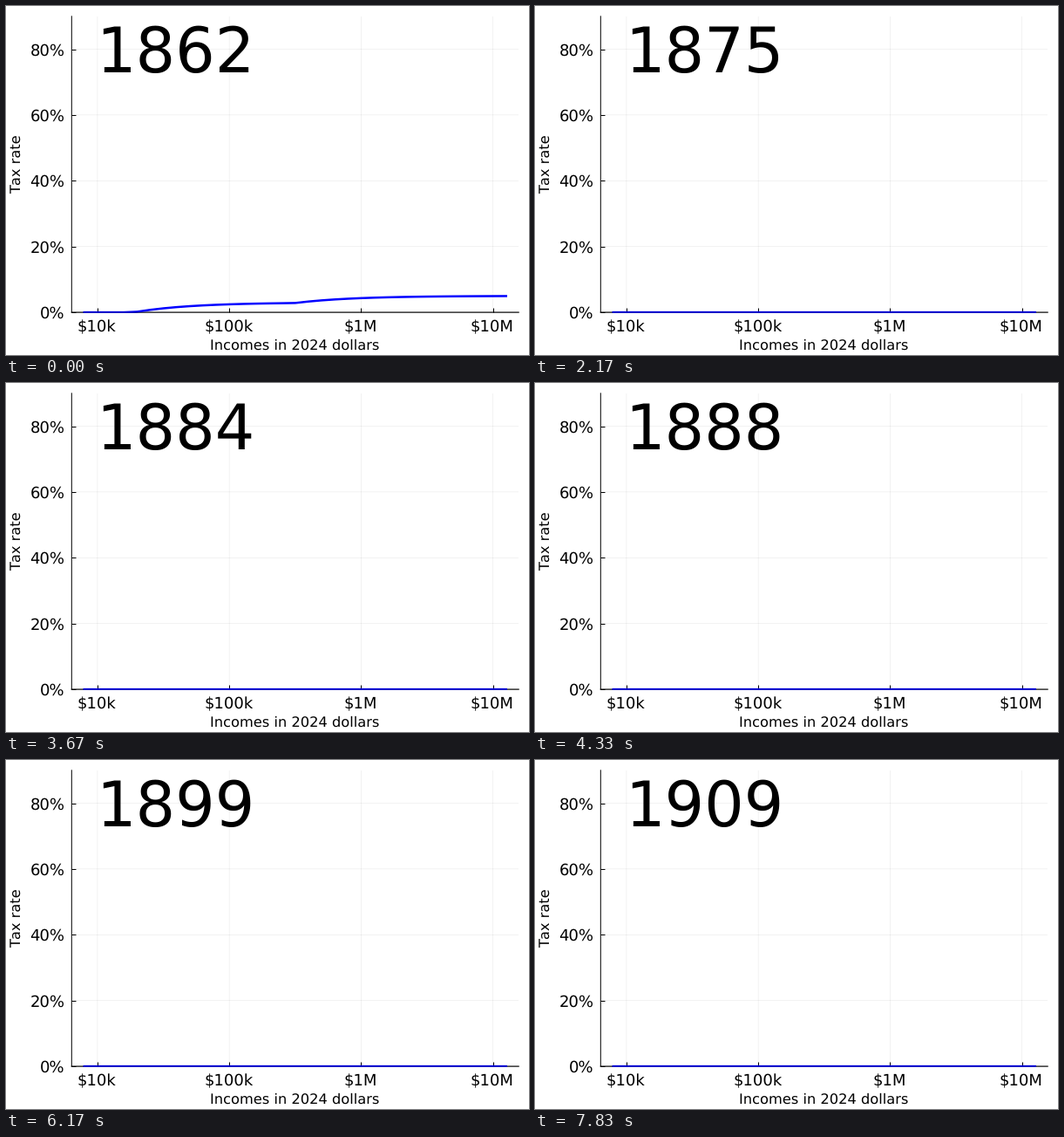
These frames come from a looping animation (600x400 px, 8000 ms). A matplotlib script:

```python
import numpy as np
import matplotlib.pyplot as plt
from matplotlib.animation import FuncAnimation
from matplotlib.transforms import Bbox

W, H, DPI = 600, 400, 100
PX = 72 / DPI                      # one pixel in points
FIRST_YEAR, YEARS = 1862, 48
LOOP_MS, STEP_MS = 8000, 20

plt.rcParams.update({
    "font.family": "DejaVu Sans",
    "text.hinting": "none",
    "text.kerning_factor": 6,      # practically no kerning
    "path.snap": False,
})

# Brackets as (threshold in dollars of the day, marginal rate in percent)
CIVIL_WAR = [(600, 3), (10000, 5)]
ACT_1864 = [(600, 5), (5000, 7.5), (10000, 10)]
ACT_1865 = [(600, 5), (5000, 10)]
ACT_1867 = [(1000, 5)]
ACT_1870 = [(2000, 2.5)]
BRACKETS = {
    1862: CIVIL_WAR, 1863: CIVIL_WAR, 1864: ACT_1864,
    1865: ACT_1865, 1866: ACT_1865,
    1867: ACT_1867, 1868: ACT_1867, 1869: ACT_1867, 1870: ACT_1867,
    1871: ACT_1870, 1872: ACT_1870,
    1894: [(4000, 2)],
}
CPI = dict(zip(range(1862, 1873), (30, 37, 47, 46, 44, 42, 40, 40, 38, 36, 36)))
CPI[1894] = 26
CPI_2024 = 939.6

log_income = np.linspace(3.9, 7.1, 33)
income = 10 ** log_income


def tax_rate(year):
    """Average tax rate in percent for each income in 2024 dollars."""
    tax = np.zeros_like(income)
    last = 0
    for threshold, rate in BRACKETS.get(year, []):
        floor = threshold * CPI_2024 / CPI[year]
        tax += (rate - last) * np.maximum(income - floor, 0)
        last = rate
    return tax / income


fig = plt.figure(figsize=(W / DPI, H / DPI), dpi=DPI, facecolor="white")
LEFT, RIGHT, TOP, BOTTOM = 75.3, 588.2, 11.8, 351.1
ax = fig.add_axes([LEFT / W, 1 - BOTTOM / H, (RIGHT - LEFT) / W, (BOTTOM - TOP) / H])
ax.set_xlim(3.804, 7.196)
ax.set_ylim(0, 90)
ax.set_xticks([4, 5, 6, 7], labels=[])
ax.set_yticks(range(0, 100, 20), labels=[])
ax.tick_params(direction="in", length=4.7 * PX, width=PX)
ax.grid(color="black", alpha=0.1, linewidth=0.5 * PX)
ax.set_axisbelow(True)
for side, spine in ax.spines.items():
    spine.set_visible(side in ("left", "bottom"))
    spine.set_linewidth(PX)
    spine.set_zorder(1.5)


def label(x, y, text, size, ha="center", **kw):
    """Text with its baseline at pixel (x, y), measured from the top left."""
    return fig.text(x / W, 1 - y / H, text.replace("$", r"\$"), fontsize=size * PX,
                    ha=ha, va="baseline", **kw)


for i, name in enumerate(("$10k", "$100k", "$1M", "$10M")):
    label(104 + 151.2 * i, 373, name, 18)
for pct in range(0, 100, 20):
    label(67.6, 358 - 3.77 * pct, f"{pct}%", 18, ha="right")
label(331, 394, "Incomes in 2024 dollars", 16.3)
label(17, 181, "Tax rate", 16.3, rotation=90, rotation_mode="anchor")

year_text = label(103, 76, str(FIRST_YEAR), 71.6, ha="left")
curve, = ax.plot(log_income, tax_rate(FIRST_YEAR), color="blue", linewidth=2.5 * PX,
                 solid_capstyle="projecting", solid_joinstyle="round", zorder=2)
curve.set_clip_box(Bbox([[LEFT, H - 352], [RIGHT, H - TOP]]))
# The axis shows faintly through the curve where it lies on zero
ax.axhline(0, color="black", alpha=0.4, linewidth=PX, zorder=3, clip_on=False)


def draw(i):
    year = FIRST_YEAR + (i * STEP_MS + 16) * YEARS // LOOP_MS
    year_text.set_text(str(year))
    curve.set_ydata(tax_rate(year))
    return year_text, curve


anim = FuncAnimation(fig, draw, frames=LOOP_MS // STEP_MS, interval=STEP_MS,
                     repeat=True, repeat_delay=0, blit=False)
plt.show()
```
